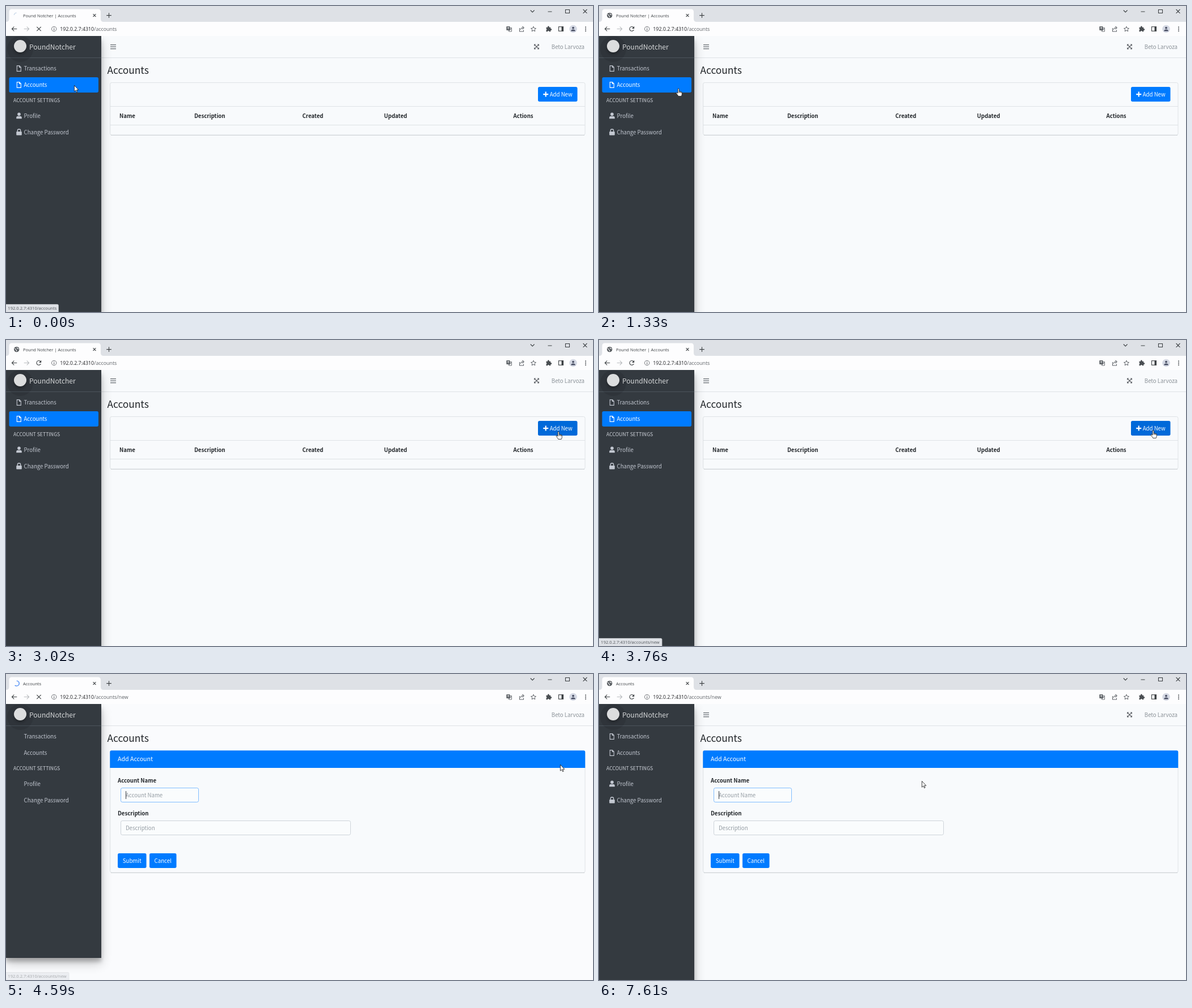
Animation, 1035 px wide and 541 px high, one loop 8 s. Source, as an HTML page:

```html
<!DOCTYPE html>
<html lang="en">
<head>
<meta charset="utf-8">
<style>
html, body { margin: 0; height: 100%; overflow: hidden; background: #f8fafc; }
svg { display: block; width: 100vw; height: 100vh; }
text { font: 9.64px "Noto Sans CJK SC", "Noto Sans CJK JP", "Source Sans Pro", "Noto Sans", sans-serif; fill: #212529; white-space: pre; }
.ui text { font-family: "Open Sans", "Noto Sans", sans-serif; fill: #3c4043; }
.b text, text.b { font-weight: 700; }
.nav text { fill: #c2c7d0; }
.w, .w text { fill: #fff; }
.hint text { fill: #939ba2; }
.mid { text-anchor: middle; }
.line { fill: none; stroke: #5f6368; stroke-width: 1.1; }
.dark { stroke: #3c4043; }
.rule { fill: none; stroke: #dee2e6; }
.blue { fill: #007bff; }
.card { fill: #f8fafc; stroke: #dfe3e6; }
.base { stroke: #cfd3d6; }
</style>
</head>
<body>
<svg viewBox="0 0 1035 541" preserveAspectRatio="none">
  <defs>
    <path id="file" d="M.6.6H5L7.6 3.2V10.4H.6ZM4.8.8V3.4H7.4" fill="none" stroke="currentColor" stroke-width="1.1"/>
  </defs>

  <rect id="bg" width="1035" height="541" fill="#f8fafc"/>
  <path class="rule" d="M168 91.5H1035"/>
  <text x="178.5" y="120" style="font-size:17.3px">Accounts</text>
  <text x="1020" y="76" text-anchor="end" style="fill:#8a9197">Beto Larvoza</text>
  <g class="icons">
    <path d="M184 68.7H194M184 72.2H194M184 75.7H194" stroke="#62686d" stroke-width="1.2"/>
    <path class="line" d="M932 68.5L939 75.5M939 68.5L932 75.5" stroke-width="1.2"/>
    <path d="M931 67.5h3.4l-3.4 3.4ZM940 67.5v3.4l-3.4-3.4ZM931 76.5v-3.4l3.4 3.4ZM940 76.5h-3.4l3.4-3.4Z" fill="#5f6368"/>
  </g>

  <g id="list">
    <rect class="card" x="183.5" y="135.5" width="837.5" height="92.5" rx="2.7"/>
    <path class="rule" d="M184 177.5H1021M184 210.5H1021"/>
    <path class="base" d="M185 228.5H1020"/>
    <g class="b">
      <text x="200" y="198">Name</text>
      <text x="332" y="198">Description</text>
      <text x="522.5" y="198">Created</text>
      <text x="666.5" y="198">Updated</text>
      <text x="894.5" y="198">Actions</text>
    </g>
    <rect id="add" x="938" y="143" width="69.5" height="26" rx="2.7"/>
    <path d="M951.7 151.6V160.6M947.2 156.1H956.2" stroke="#fff" stroke-width="2.1"/>
    <text class="w" x="958.7" y="160">Add New</text>
  </g>

  <g id="form">
    <rect class="card" x="183.5" y="135.5" width="837.5" height="215.5" rx="2.7"/>
    <path class="base" d="M185 351.5H1020"/>
    <path class="blue" d="M183.3 166V138q0-2.8 2.8-2.8H1018.400q2.800 0 2.800 2.800V166Z"/>
    <text class="w" x="197" y="154" style="font-size:10.6px">Add Account</text>
    <g class="b">
      <text x="197" y="192">Account Name</text>
      <text x="197" y="250">Description</text>
    </g>
    <g fill="#fafcfd" stroke="#ced4da">
      <rect x="202.5" y="201.5" width="137" height="25" rx="2.7" stroke="#80bdff"/>
      <rect x="202.5" y="259.5" width="405" height="25" rx="2.7"/>
    </g>
    <g class="hint">
      <text x="211" y="218">Account Name</text>
      <text x="211" y="276">Description</text>
    </g>
    <path id="caret" d="M211.5 207V221" stroke="#343a40"/>
    <rect class="blue" x="197" y="317" width="50.500" height="26" rx="2.7"/>
    <rect class="blue" x="253" y="317" width="47.500" height="26" rx="2.7"/>
    <g class="w mid">
      <text x="222.2" y="334">Submit</text>
      <text x="276.7" y="334">Cancel</text>
    </g>
  </g>

  <rect class="side" y="62.4" width="168" opacity=".22" style="filter:blur(9.4px)"/>
  <rect class="side" y="59.7" width="168" opacity=".2" style="filter:blur(3.4px)"/>
  <rect class="side" y="53" width="168" fill="#343a40"/>
  <path d="M0 91.5H168" stroke="#4b545c"/>
  <circle cx="25" cy="76" r="23" opacity=".1"/>
  <circle cx="25" cy="74" r="11.5" opacity=".25" style="filter:blur(2px)"/>
  <circle cx="25" cy="71" r="11" fill="#dcddde"/>
  <g class="nav">
    <text x="41" y="76.500" style="font-size:12.05px;fill:#d6d8d9"><tspan font-weight="300">Pound</tspan>Notcher</text>
    <rect id="active" class="blue" x="5.5" y="126" width="157.5" height="27" rx="2.7"/>
    <text x="31.5" y="114.3">Transactions</text>
    <text id="accounts" x="31.5" y="143.3">Accounts</text>
    <text x="13" y="170.300" style="font-size:8.67px;fill:#d0d4db">ACCOUNT SETTINGS</text>
    <text x="31.5" y="198">Profile</text>
    <text x="31.5" y="227">Change Password</text>
    <g class="icons" fill="#c2c7d0" color="#c2c7d0">
      <use href="#file" x="18.700" y="105"/>
      <use id="accountsIcon" href="#file" x="18.700" y="134"/>
      <circle cx="23" cy="191.300" r="2.800"/>
      <path d="M18.200 199.300V197.500q0-2.700 2.700-2.700H25.100q2.700 0 2.700 2.700V199.300Z"/>
      <rect x="18.200" y="222" width="9.600" height="6.500" rx="1"/>
      <path d="M20.300 222.500V220.500a2.700 2.700 0 0 1 5.400 0V222.500" fill="none" stroke="#c2c7d0" stroke-width="1.400"/>
    </g>
  </g>

  <g class="ui">
    <rect width="1035" height="28" fill="#dee1e6"/>
    <rect y="28" width="1035" height="25" fill="#fdfdfe"/>
    <path d="M0 28Q5.500 28 5.500 23V10.500Q5.500 5.500 10.500 5.500H162Q167 5.500 167 10.500V23Q167 28 172 28Z" fill="#fdfdfe"/>
    <g id="globe">
      <circle cx="18.700" cy="16.600" r="4.700" fill="#55595d"/>
      <path d="M15.200 15.200q2 .2 2 1.600t1.600 1.500l-.4 1.700M19.300 13.200q-.2 1.600 1.200 1.900t2 .8" fill="none" stroke="#eceeef" stroke-width="1.200"/>
    </g>
    <circle id="spin" cx="18.700" cy="16.600" r="4.500" fill="none" stroke-width="1.400"/>
    <text id="title" x="30" y="19.500" style="font-size:7.55px"></text>
    <path class="line dark" d="M153.600 14.200L158.400 19M158.400 14.200L153.600 19M181.500 12.300V21M177.200 16.600H185.800"/>
    <path class="line dark" d="M924.800 7.500L928.200 11L931.600 7.500M955.500 10H962.500M986.500 6.500H993.500V12.500H986.500ZM1017.600 6L1024.400 12.800M1024.400 6L1017.600 12.800"/>

    <path class="line dark" d="M19.300 40.500H10.500M14.300 36.600L10.400 40.500L14.300 44.400"/>
    <path class="line" style="stroke:#b8bbbe" d="M31.700 40.500H40.500M36.700 36.600L40.600 40.500L36.700 44.400"/>
    <path id="stop" class="line dark" d="M54.300 36.800L61.700 44.200M61.700 36.800L54.300 44.200"/>
    <g id="reload">
      <path class="line dark" d="M61.400 42A3.900 3.900 0 1 1 60.600 37.600"/>
      <path d="M62.200 35.800V39.900H58.100Z" fill="#3c4043"/>
    </g>
    <circle class="line" cx="84.700" cy="40.500" r="4.200" style="stroke-width:.9"/>
    <path class="line" d="M84.700 39.800V42.900M84.700 37.900V39"/>
    <text x="95.300" y="43.800" style="font-size:8.83px;fill:#202124">192.0.2.7:4310<tspan id="path" fill="#5f6368"></tspan></text>

    <rect x="882.300" y="36" width="6.300" height="7" rx=".8" fill="#5f6368"/>
    <path class="line" d="M888.500 38.500H891.500V45H886.500V43M888 40.500H891M889.500 40.500Q889.500 42.500 887.500 43.500" style="stroke-width:.9"/>
    <path d="M884 38.200H887M885.500 37.500V41" stroke="#fff" stroke-width=".8"/>
    <path class="line" d="M905.500 39V45H912.500V42.500M907.300 42Q907.800 38.700 911.500 38.500M910.500 36L913.200 38.500L910.500 41"/>
    <path class="line" d="M930 36.200L931.300 39.200L934.500 39.500L932.100 41.700L932.800 44.800L930 43.200L927.200 44.800L927.900 41.700L925.500 39.500L928.700 39.200Z" style="stroke-width:1"/>
    <path d="M952.500 37.700H955V37a1.400 1.400 0 0 1 2.800 0V37.700H960.300V40.200H960.900a1.400 1.400 0 0 1 0 2.800H960.300V45.300H957.800a1.400 1.400 0 0 0-2.800 0H952.500V42.700a1.400 1.400 0 0 0 0-2.600Z" fill="#4a4e52"/>
    <rect class="line dark" x="974.500" y="36.700" width="8" height="7.600"/>
    <rect x="979.500" y="36.500" width="3.500" height="8" fill="#3c4043"/>
    <circle cx="1000" cy="40.500" r="6.800" fill="#d5d9e4"/>
    <circle cx="1000" cy="38.700" r="1.900" fill="#4b5166"/>
    <path d="M996.200 44.500Q996.200 41.600 1000 41.600T1003.800 44.500Z" fill="#4b5166"/>
    <path d="M1022 36.500V45" stroke="#4a4e52" stroke-width="1.800" stroke-dasharray="1.800 1.550"/>

    <g id="status">
      <path id="bubble" fill="#dee1e6" stroke="#c4c8cc" stroke-width=".7"/>
      <text id="link" x="3.300" y="537" style="font-size:7.6px;fill:#50555a"></text>
    </g>
  </g>

  <g id="cursor">
    <path id="arrow" d="M.4.4V11.200L2.900 8.900L4.500 12.600L6.100 11.900L4.500 8.300H7.800Z" fill="#fff" stroke="#111" stroke-width=".8"/>
    <path id="hand" d="M-1 1.200Q-1-.2.100-.2T1.200 1.200V5Q2.300 4.300 3 5.400Q4.300 4.800 4.900 5.900Q6.300 5.600 6.300 7.200V9.500Q6.300 11.500 5.200 13.400H-.2Q-1 11.800-2.300 10.200L-3.800 8.300Q-4.200 7.200-3.200 7T-1 8.300Z M1.200 5V7.500M3 5.500V7.700M4.900 6V7.900" fill="#fff" stroke="#111" stroke-width=".8"/>
    <path id="beam" d="M-2-5.500H-.6L0-5L.6-5.500H2M0-5V5M-2 5.500H-.6L0 5L.6 5.500H2" fill="none" stroke="#222" stroke-width=".9"/>
  </g>
</svg>

<script>
const LOOP = 8000, OPEN = 4590, READY = 4680;
const $ = id => document.getElementById(id);
const all = (css, fn) => document.querySelectorAll(css).forEach(fn);
const show = (id, on) => $(id).style.display = on ? '' : 'none';
const clamp = v => Math.max(0, Math.min(1, v));

const moves = [
  [0, 120, 140], [1150, 121, 141], [1240, 128, 143], [1330, 140, 146], [1420, 160, 150],
  [1510, 184, 154], [1600, 192, 164], [1690, 224, 173], [1760, 300, 193], [1850, 432, 224],
  [1940, 511, 241], [2030, 593, 251], [2120, 660, 251], [2210, 724, 247], [2300, 767, 233],
  [2390, 809, 217], [2480, 857, 202], [2570, 893, 186], [2660, 932, 176], [2750, 954, 171],
  [2840, 964, 167], [2930, 970, 164], [3020, 974, 162], [3270, 977, 160], [5990, 977, 166],
  [6080, 965, 208], [6160, 816, 221], [6230, 672, 224], [6310, 618, 224], [6400, 560, 225],
  [6490, 490, 224], [6580, 420, 225], [6670, 354, 225], [6760, 321, 224], [6830, 319, 222],
  [6990, 316, 219], [7150, 314, 217], [7420, 345, 210], [7520, 489, 208], [7610, 569, 189]
];
const blinks = [5100, 5570, 6080, 6580, 7080, 7610];

function drawCursor(t, form) {
  const [, x, y] = moves.findLast(m => m[0] <= t);
  const inside = (l, top, r, b) => x > l && x < r && y > top && y < b;
  const onAdd = !form && inside(938, 143, 1007, 169);
  const hand = onAdd || (t >= 180 && !form && inside(5, 126, 163, 153));
  const beam = form && inside(203, 201, 339, 227);
  $('cursor').setAttribute('transform', `translate(${x} ${y})`);
  show('hand', hand);
  show('beam', beam);
  show('arrow', !hand && !beam);
  $('add').setAttribute('fill', onAdd ? '#0069d9' : '#007bff');
}

function drawTab(t, form) {
  const loading = t < 180 || (t >= 3850 && t < READY);
  const blue = loading && t >= 4300;
  const angle = blue ? -90 + (t - OPEN) * .45 : 190 - t * .36;
  const spin = $('spin');
  spin.setAttribute('transform', `rotate(${angle} 18.7 16.6)`);
  spin.setAttribute('stroke', blue ? '#4285f4' : t < 180 ? '#c9d8ea' : '#9aa0a6');
  spin.setAttribute('stroke-dasharray', blue ? '17 12' : '6 23');
  show('spin', loading);
  show('stop', loading);
  show('globe', !loading);
  show('reload', !loading);
  $('title').textContent = form ? 'Accounts' : 'Pound Notcher | Accounts';
  $('path').textContent = form ? '/accounts/new' : '/accounts';
}

function drawStatus(t) {
  const adding = t > 1000, right = adding ? 111 : 92.5;
  const alpha = !adding ? clamp(1 - (t - 330) / 340)
    : t < 3430 || t >= READY ? 0 : t < 3520 ? .5 : t < OPEN ? 1 : .5;
  $('status').setAttribute('opacity', alpha);
  $('bubble').setAttribute('d', `M-1 527.5H${right - 2}Q${right} 527.5 ${right} 529.5V542H-1Z`);
  $('link').textContent = '192.0.2.7:4310/accounts' + (adding ? '/new' : '');
}

function draw(now) {
  const t = now % LOOP, form = t >= OPEN, bare = form && t < READY;
  show('list', !form);
  show('form', form);
  show('active', !form);
  show('caret', blinks.filter(b => b <= t).length % 2 === 0);
  $('accounts').style.fill = form ? '' : '#fff';
  $('accountsIcon').style.color = form ? '' : '#fff';
  $('bg').setAttribute('fill', bare ? '#fafbfd' : '#f8fafc');
  all('.icons', e => e.style.display = bare ? 'none' : '');
  all('.side', e => e.setAttribute('height', bare ? 449 : 540));
  drawTab(t, form);
  drawStatus(t);
  drawCursor(t, form);
  requestAnimationFrame(draw);
}
requestAnimationFrame(draw);
</script>
</body>
</html>
```
